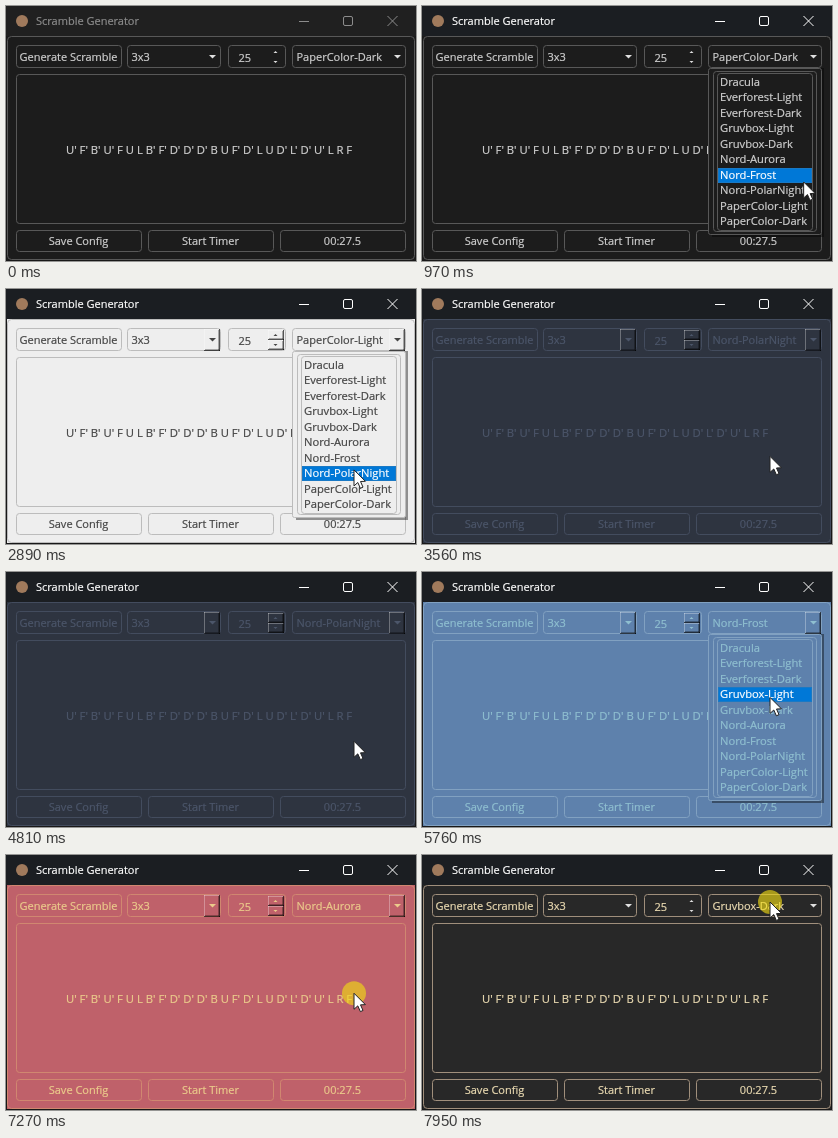
An HTML page with a canvas for the animation above (8000 ms loop, 410x255 px).

```html
<!DOCTYPE html>
<html>
<head>
<meta charset="utf-8">
<title>Scramble Generator</title>
<style>
html, body { margin: 0; width: 100%; height: 100%; overflow: hidden; background: #181818; }
canvas { display: block; }
</style>
</head>
<body>
<canvas id="stage" width="410" height="255"></canvas>
<script>
const ctx = document.getElementById('stage').getContext('2d');
const LOOP = 8000, ROW = 15.5, LIST_TOP = 68.5, POPUP_HEIGHT = 167, UNROLL = 150;
const HOME = { x: 348, y: 47 }, ENTRY = { x: 392, y: 250 };
const ITEMS = ['Dracula', 'Everforest-Light', 'Everforest-Dark', 'Gruvbox-Light', 'Gruvbox-Dark',
  'Nord-Aurora', 'Nord-Frost', 'Nord-PolarNight', 'PaperColor-Light', 'PaperColor-Dark'];

// Each theme shows from `at`; its list opens, the pointer reaches the next theme's row and picks it.
const THEMES = [
  { name: 'PaperColor-Dark', at: 0, open: 700, reach: 1000, pick: 1380, x: 388,
    bg: '#1c1c1c', fg: '#d0d0d0', line: '#585858' },
  { name: 'PaperColor-Light', at: 1580, open: 2400, reach: 2900, pick: 2960,
    bg: '#eeeeee', fg: '#444444', line: '#bcbcbc', raised: true },
  { name: 'Nord-PolarNight', at: 3160, open: 3980, reach: 4550, pick: 4610,
    bg: '#2e3440', fg: '#4c566a', line: '#434c5e', raised: true },
  { name: 'Nord-Frost', at: 4950, open: 5350, reach: 5850, pick: 5900,
    bg: '#5e81ac', fg: '#8fbfd0', line: '#81a1c1', raised: true },
  { name: 'Nord-Aurora', at: 6100, open: 6660, reach: 7210, pick: 7270,
    bg: '#bf616a', fg: '#ebcb8b', line: '#d08770', raised: true },
  { name: 'Gruvbox-Dark', at: 7470, open: LOOP, bg: '#282828', fg: '#ebdbb2', line: '#a08f7c' }
];
THEMES.forEach((theme, i) => {
  const next = THEMES[i + 1];
  theme.start = i ? THEMES[i - 1].goal : ENTRY;
  theme.goal = next && { x: theme.x || HOME.x, y: LIST_TOP + (ITEMS.indexOf(next.name) + 0.5) * ROW };
});

function glide(a, b, t0, t1, t, power) {
  const k = Math.min(1, Math.max(0, (t - t0) / (t1 - t0))) ** power;
  return { x: a.x + (b.x - a.x) * k, y: a.y + (b.y - a.y) * k };
}

function pointerAt(t, theme) {
  return t < theme.open + 50
    ? glide(theme.start, HOME, theme.at + 80, theme.open - 100, t, 3)
    : glide(HOME, theme.goal, theme.open + 50, theme.reach, t, 1.4);
}

function text(str, x, y, color, size = 11, align = 'left') {
  ctx.font = `${size}px "Open Sans", "Noto Sans", sans-serif`;
  ctx.textAlign = align;
  ctx.fillStyle = ctx.strokeStyle = color;
  ctx.lineWidth = 0.2;
  ctx.fillText(str, x, y);
  ctx.strokeText(str, x, y);
}

function box(x, y, w, h, line, fill, radius = 3) {
  ctx.beginPath();
  ctx.roundRect(x + 0.5, y + 0.5, w, h, radius);
  if (fill) { ctx.fillStyle = fill; ctx.fill(); }
  ctx.strokeStyle = line;
  ctx.lineWidth = 1;
  ctx.stroke();
}

function polygon(points, fill, stroke) {
  ctx.beginPath();
  points.forEach(([x, y]) => ctx.lineTo(x, y));
  ctx.closePath();
  ctx.fillStyle = fill;
  ctx.fill();
  if (stroke) { ctx.strokeStyle = stroke; ctx.lineWidth = 1; ctx.stroke(); }
}

function disc(x, y, r, fill) {
  ctx.beginPath();
  ctx.arc(x, y, r, 0, 7);
  ctx.fillStyle = fill;
  ctx.fill();
}

function arrow(x, y, w, h, theme) {
  polygon([[x - w, y], [x + w, y], [x, y + h]], theme.raised ? theme.fg : '#e0e0e0');
}

function bevel(x, y, w, h) {
  const frame = (inset, color) => {
    ctx.fillStyle = color;
    ctx.fillRect(x + inset, y + h - 1 - inset, w - 2 * inset, 1);
    ctx.fillRect(x + w - 1 - inset, y + inset, 1, h - 2 * inset);
  };
  ctx.fillStyle = 'rgba(255,255,255,.3)';
  ctx.fillRect(x, y, w, 1);
  ctx.fillRect(x, y, 1, h);
  frame(1, 'rgba(0,0,0,.3)');
  frame(0, 'rgba(0,0,0,.65)');
}

function titleBar(active) {
  const color = active ? '#ffffff' : '#8c8c8c';
  ctx.fillStyle = active ? '#1b1e22' : '#202020';
  ctx.fillRect(0, 0, 410, 30);
  disc(16, 15, 6, '#a07a5c');
  text('Scramble Generator', 30, 19, color);
  box(337, 10, 9, 9, color, null, 1.5);
  ctx.beginPath();
  ctx.moveTo(293, 15.5); ctx.lineTo(303, 15.5);
  ctx.moveTo(381.5, 10); ctx.lineTo(391.5, 20);
  ctx.moveTo(391.5, 10); ctx.lineTo(381.5, 20);
  ctx.stroke();
}

function combo(x, w, label, theme) {
  box(x, 39, w, 22, theme.line);
  text(label, x + 4.5, 55, theme.fg);
  if (theme.raised) bevel(x + w - 16, 40, 16, 22);
  arrow(x + w - 7.5, 49, 3.5, 3.5, theme);
}

function spinBox(theme) {
  box(222, 39, 57, 22, theme.line);
  text('25', 232.5, 55.5, theme.fg);
  [-1, 1].forEach(dir => {
    if (theme.raised) bevel(262, 46 + 5 * dir, 16, 10);
    arrow(269.5, 51 + 4 * dir, 2, 2 * dir, theme);
  });
}

function button(x, y, w, h, label, theme) {
  box(x, y, w, h, theme.line);
  text(label, x + w / 2, y + h - 6, theme.fg, 11, 'center');
}

function popup(theme, age, pointer) {
  const shown = POPUP_HEIGHT * Math.min(1, age / UNROLL);
  const row = Math.floor((pointer.y - LIST_TOP) / ROW);
  const selected = row < 0 ? ITEMS.indexOf(theme.name) : row;
  ctx.fillStyle = 'rgba(0,0,0,.4)';
  ctx.fillRect(290, 62, 112, shown + 2);
  ctx.save();
  ctx.beginPath();
  ctx.rect(286, 62, 114, shown);
  ctx.clip();
  ctx.translate(0, shown - POPUP_HEIGHT);
  box(286, 62, 113, 166, theme.line, theme.bg, 2);
  box(291, 65, 103, 160, theme.line);
  box(295, 67, 95, 157, theme.line);
  ITEMS.forEach((name, i) => {
    const y = Math.round(LIST_TOP + i * ROW), chosen = i === selected;
    if (chosen) {
      ctx.fillStyle = '#0078d7';
      ctx.fillRect(296, y, 94, 15);
      ctx.setLineDash([1, 1]);
      ctx.strokeStyle = '#ff8728';
      ctx.strokeRect(296.5, y + 0.5, 93, 14);
      ctx.setLineDash([]);
    }
    text(name, 298, y + 11, chosen ? '#ffffff' : theme.fg, 11.2);
  });
  ctx.restore();
}

function drawPointer({ x, y }) {
  ctx.save();
  ctx.translate(x, y);
  polygon([[0, 0], [0, 16], [3.8, 12.6], [6.4, 18.4], [9, 17.2], [6.5, 11.6], [11.4, 11.4]], '#ffffff', '#222222');
  ctx.restore();
}

function draw(t) {
  const theme = THEMES.filter(s => s.at <= t).pop();
  const pointer = pointerAt(t, theme);

  ctx.fillStyle = '#181818';
  ctx.fillRect(0, 0, 410, 255);
  titleBar(t >= 620);
  ctx.fillStyle = theme.bg;
  ctx.fillRect(1, 30, 408, 224);
  box(1, 30, 407, 223, theme.line, null, 4);

  button(10, 39, 105, 22, 'Generate Scramble', theme);
  combo(121, 93, '3x3', theme);
  spinBox(theme);
  combo(286, 113, theme.name, theme);
  box(10, 68, 389, 149, theme.line);
  text("U' F' B' U' F U L B' F' D' D' D' B U F' D' L U D' L' D' U' L R F", 60, 147.5, theme.fg, 11.25);
  ['Save Config', 'Start Timer', '00:27.5'].forEach((label, i) =>
    button(10 + 132 * i, 224, 125, 21, label, theme));

  if (t >= theme.open && t < theme.pick) popup(theme, t - theme.open, pointer);
  if (t >= 70) {
    const pressed = [theme.open, theme.pick].some(c => t >= c - 60 && t < c + 120);
    if (pressed) disc(pointer.x, pointer.y, 12, 'rgba(240,218,20,.64)');
    drawPointer(pointer);
  }
}

function tick() {
  draw(performance.now() % LOOP);
  requestAnimationFrame(tick);
}
tick();
</script>
</body>
</html>
```
